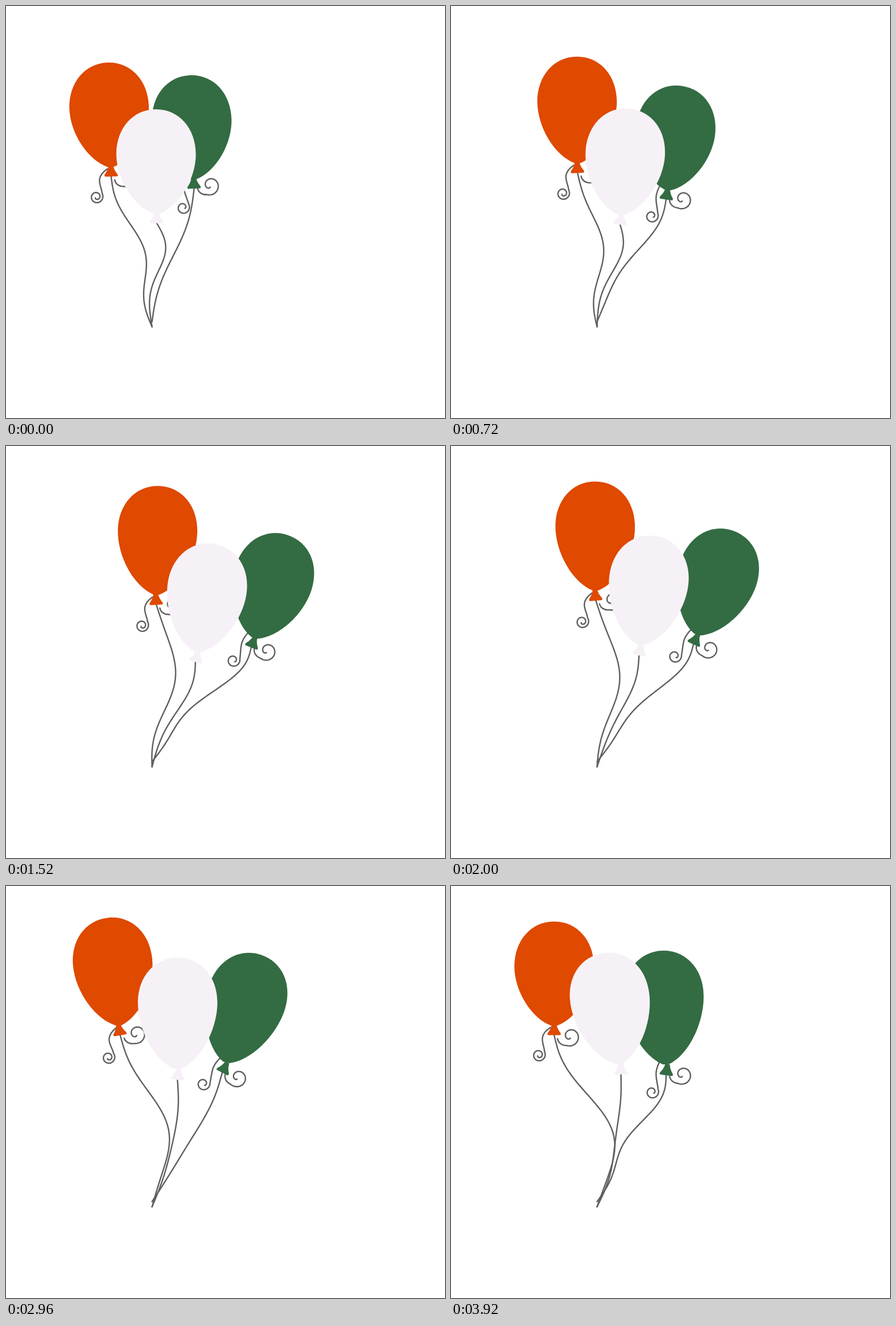
These frames come from a looping animation (762x714 px, 3.96 s). An HTML page with a canvas:

```html
<!DOCTYPE html>
<html lang="en">
<head>
<meta charset="utf-8">
<title>Balloons</title>
<style>
  html, body { margin: 0; width: 762px; height: 714px; overflow: hidden; background: #fff; }
  canvas { display: block; }
</style>
</head>
<body>
<canvas id="stage" width="762" height="714"></canvas>
<script>
const ctx = document.getElementById('stage').getContext('2d');
const LOOP = 3960, STEP = 40;
const KEYS = [0, 1680, 3360, 3920];
const LIFT = { from: 1120, time: 560, height: 10 };

// A stem that runs into a tightening spiral, placed relative to the knot.
function curl([x, y], c1, c2, [cx, cy], r0, r1, from, sweep) {
  const path = new Path2D();
  const spiral = s => {
    const r = r1 + (r0 - r1) * (1 - s) ** 0.7;
    const a = (from + sweep * s) * Math.PI / 180;
    return [cx + r * Math.cos(a), cy + r * Math.sin(a)];
  };
  path.moveTo(x, y);
  path.bezierCurveTo(...c1, ...c2, ...spiral(0));
  for (let i = 1; i <= 48; i++) path.lineTo(...spiral(i / 48));
  return path;
}

const rightCurl = y => curl([6, y], [7, y + 7], [13, y + 12], [28, y - 4], 17, 3, 110, -380);

// Poses: body x, y; knot x, y; then the string's three sway waves.
const orange = {
  color: '#df4900', tip: [253.5, 556], side: -1,
  curls: [curl([-6, -13], [-30, 2], [-17, 16], [-26.5, 35], 11.5, 2.5, -30, 530), rightCurl(6.5)],
  poses: [
    [179, 176, 182.5, 295, 14, 0, -9],
    [272, 152, 269, 280.5, 31, 10, -5],
    [158, 139.5, 176, 264.5, 50, -15, -7],
    [179, 149.5, 179, 268, 49, -15, -7]
  ]
};
const green = {
  color: '#336b42', tip: [253.5, 547], side: 1,
  curls: [curl([-14, -22], [-22, 0], [-16, 6], [-20.5, 32.5], 11.5, 3.5, -30, 415), rightCurl(0)],
  poses: [
    [322.5, 198, 326.5, 316, 1, 7, 0],
    [479.5, 239.5, 436, 360, -4, 12, 8],
    [399, 192, 356.5, 324.5, 15, 0, -1],
    [369.5, 200, 373.5, 337.5, 0, 6, 8]
  ]
};
const white = {
  color: '#f6f1f6', tip: [253.5, 556], side: 1, curls: [],
  poses: [
    [260.5, 257, 261.5, 376, 6, 12, 2],
    [358.5, 253.5, 336, 381.5, 3, 7, 1],
    [279, 199, 285.5, 334, 18, -1, 1],
    [275.5, 203.5, 295, 336, 13, -2, 2]
  ]
};
const balloons = [orange, green, white];

function poseAt({ poses, side }, t) {
  let i = 0;
  while (i < KEYS.length - 2 && t >= KEYS[i + 1]) i++;
  const k = (t - KEYS[i]) / (KEYS[i + 1] - KEYS[i]);
  const lift = LIFT.height * Math.min(1, Math.max(0, (t - LIFT.from) / LIFT.time));
  const [x, cy, kx, ky, ...sway] = poses[i].map((v, j) => v + (poses[i + 1][j] - v) * k);
  const angle = Math.atan2(x - kx, ky - cy);
  const stretch = Math.hypot(kx - x, ky - cy) / 119;
  return { x, y: cy - lift, kx, ky: ky - lift, sway, angle, stretch, tilt: angle + side * (stretch - 1) };
}

// Runs fn in coordinates centred on x, y and turned by angle.
function within(x, y, angle, fn) {
  ctx.save();
  ctx.translate(x, y);
  ctx.rotate(angle);
  fn();
  ctx.restore();
}

function drawString([tipX, tipY], { kx, ky, sway }) {
  ctx.beginPath();
  for (let i = 0; i <= 60; i++) {
    const u = i / 60;
    const bend = sway.reduce((sum, a, n) => sum + a * Math.sin((n + 1) * Math.PI * u), 0);
    ctx.lineTo(kx + (tipX - kx) * u + bend, ky + (tipY - ky) * u);
  }
  ctx.stroke();
}

function drawBody(s) {
  ctx.beginPath();
  ctx.moveTo(-69, 0);
  ctx.bezierCurveTo(-69, -45, -40, -78, 0, -78);
  ctx.bezierCurveTo(40, -78, 69, -45, 69, 0);
  ctx.bezierCurveTo(69, 42 * s, 40, 90 * s, 5, 103 * s);
  ctx.lineTo(-5, 103 * s);
  ctx.bezierCurveTo(-40, 90 * s, -69, 42 * s, -69, 0);
  ctx.fill();
}

function drawKnot() {
  ctx.beginPath();
  ctx.moveTo(-4, -19);
  ctx.quadraticCurveTo(-5, -11, -11, -3.5);
  ctx.quadraticCurveTo(-13, 0.5, -9, 0.5);
  ctx.lineTo(9, 0.5);
  ctx.quadraticCurveTo(13, 0.5, 11, -3.5);
  ctx.quadraticCurveTo(5, -11, 4, -19);
  ctx.fill();
}

function draw(now) {
  const t = Math.floor((now % LOOP) / STEP) * STEP;
  const scene = balloons.map(b => [b, poseAt(b, t)]);

  ctx.fillStyle = '#fff';
  ctx.fillRect(0, 0, 762, 714);
  ctx.strokeStyle = '#5f5f5f';
  ctx.lineWidth = 2.4;
  ctx.lineCap = ctx.lineJoin = 'round';

  for (const [b, p] of scene) {
    drawString(b.tip, p);
    within(p.kx, p.ky, p.tilt, () => b.curls.forEach(c => ctx.stroke(c)));
  }
  for (const [b, p] of scene) {
    ctx.fillStyle = b.color;
    within(p.x, p.y, p.angle, () => drawBody(p.stretch));
    within(p.kx, p.ky, p.tilt, drawKnot);
  }
}

const start = performance.now();
function tick() {
  draw(performance.now() - start);
  requestAnimationFrame(tick);
}
tick();
</script>
</body>
</html>
```
